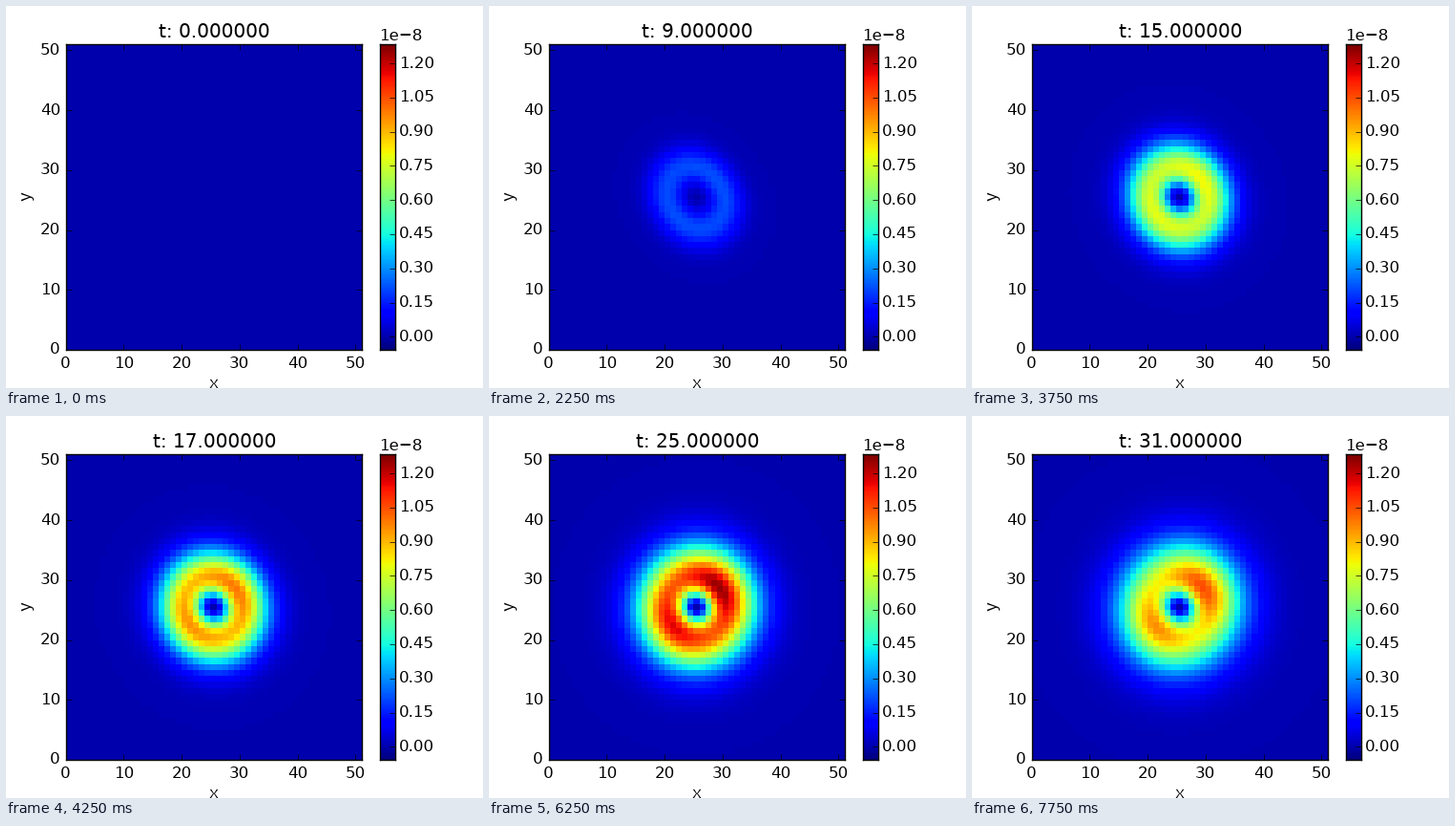
These frames come from a looping animation (500 by 400 pixels, 8 s). A matplotlib script:

```python
import numpy as np
import matplotlib.pyplot as plt
from matplotlib.animation import FuncAnimation

W, H = 500, 400
N = 51                          # cells per side
FRAMES, INTERVAL = 32, 250
VMIN, VMAX = -0.0574, 1.2843    # in units of 1e-8

plt.rcParams.update({
    "font.family": "DejaVu Sans", "font.size": 12,
    "text.hinting": "native",
    "axes.linewidth": 1.0, "axes.titlesize": 14.4, "axes.titlepad": 5,
    "xtick.direction": "in", "ytick.direction": "in",
    "xtick.major.size": 4, "ytick.major.size": 4,
    "xtick.major.width": 0.5, "ytick.major.width": 0.5,
    "xtick.major.pad": 4, "ytick.major.pad": 4,
    "xtick.top": True, "ytick.right": True,
    "ytick.alignment": "center",
})

cells = np.arange(N) - N // 2
X, Y = np.meshgrid(cells, cells)
R = np.hypot(X, Y)
ANGLE = np.arctan2(Y, X) - np.radians(40)


def strength(t):
    """Overall ring level: quick growth, peak near t = 23, slow decay."""
    if t == 0:
        return 0.0
    u = np.log(t / 23)
    return 1.15 * np.exp(-(2.4 + 0.5 * u) * u**2)


def field(t):
    # The ring starts compact and squeezed, then rounds out and grows a tail
    squeeze = 0.12 * np.exp(-t**2 / 200)
    shape = 1 - squeeze * (np.cos(2 * ANGLE) + 0.4 * np.cos(ANGLE))
    s = R / ((4.9 + 0.008 * t) * shape)
    falloff = 0.7 + 16.5 / (t + 1.6)
    ring = s**2.2 * np.exp(-2.2 / falloff * (s**falloff - 1))
    bias = 0.0006 * t**1.5
    lobes = 1 + bias * (np.cos(2 * ANGLE) + 0.5 * np.cos(ANGLE))
    return strength(t) * ring * lobes


fig = plt.figure(figsize=(W / 100, H / 100), dpi=100, facecolor="white")

ax = fig.add_axes([0.125, 0.1, 0.62, 0.8])
edges = np.arange(N + 1)
mesh = ax.pcolormesh(edges, edges, field(0), cmap="jet", vmin=VMIN, vmax=VMAX)
ax.set(xlim=(0, N), ylim=(0, N),
       xticks=range(0, N, 10), yticks=range(0, N, 10))
title = ax.set_title("t: %f" % 0, x=0.503)
fig.text(217.5 / W, 0.5 / H, "x", ha="center", va="baseline")
fig.text(30 / W, 0.5025, "y", ha="right", va="center", rotation=90)

# Colour scale
bar = fig.add_axes([0.78375, 0.1, 0.032, 0.8])
bar.imshow(np.linspace(0, 1, 256)[:, None], cmap="jet", origin="lower",
           aspect="auto", extent=(0, 1, VMIN, VMAX))
levels = np.arange(9) * 0.15
bar.set_xticks([])
bar.set_yticks(levels, ["%.2f" % v for v in levels])
bar.tick_params(axis="y", left=False, right=True, pad=3,
                labelleft=False, labelright=True)
fig.text(391 / W, 1 - 36.5 / H, "1e\u22128", ha="left", va="baseline")


def update(t):
    mesh.set_array(field(t))
    title.set_text("t: %f" % t)
    return mesh, title


anim = FuncAnimation(fig, update, frames=FRAMES, interval=INTERVAL,
                     repeat=True, repeat_delay=0, blit=False)
plt.show()
```
